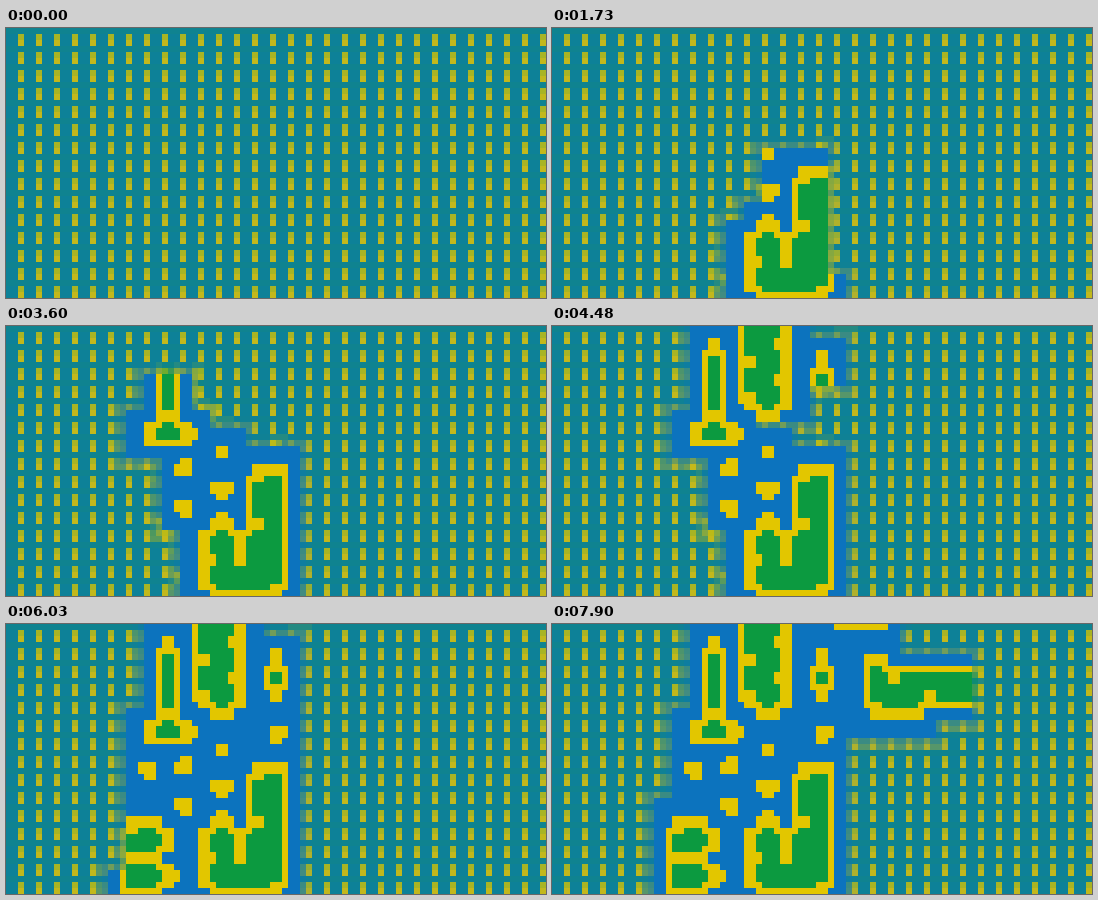
Animation, 540 px wide and 270 px high, one loop 8 s. Source, as an HTML page with a canvas:

```html
<!DOCTYPE html>
<html lang="en">
<head>
<meta charset="utf-8">
<title>Islands</title>
<style>
html, body { margin: 0; width: 100%; height: 100%; overflow: hidden; background: #0b8294; }
canvas { display: block; }
</style>
</head>
<body>
<canvas id="stage" width="540" height="270"></canvas>
<script>
const LOOP = 8000, PX = 6, COLS = 30, ROWS = 15;
const SEA = [12, 115, 190], SAND = [226, 198, 0], GRASS = [12, 154, 64];
const TEAL = [13, 129, 152], TEAL_TOP = [15, 131, 144];
const DASH = [[168, 180, 36], [194, 184, 28]];

const mix = (a, b, k) => a.map((v, i) => v + (b[i] - v) * k);

// --- Terrain: grass blocks, a beach around all grass, and bare sand spits ---
const grass = new Set(), spits = new Set();
const key = (x, y) => x + ',' + y;
const bite = (x, y) => grass.delete(key(x, y));

function block(x, y, w, h, cutCorners = '') {
  for (let j = 0; j < h; j++)
    for (let i = 0; i < w; i++) grass.add(key(x + i, y + j));
  for (const corner of cutCorners.split(' ').filter(Boolean))
    bite(corner[1] === 'w' ? x : x + w - 1, corner[0] === 'n' ? y : y + h - 1);
}

function spit(x, y, arms = '') {
  spits.add(key(x, y));
  const step = { N: [0, -1], S: [0, 1], W: [-1, 0], E: [1, 0] };
  for (const arm of arms) spits.add(key(x + step[arm][0], y + step[arm][1]));
}

// West
block(18, 4, 1, 6);
block(18, 11, 1, 1);
block(17, 12, 3, 1);
spit(18, 3, 'N');
spit(20, 12, 'E');
// North
block(22, 0, 4, 9, 'sw');
block(24, 9, 1, 1);
bite(22, 4);
bite(25, 2);
bite(25, 6);
block(33, -1, 4, 1);
// Islets
block(30, 6, 1, 1);
spit(30, 4, 'NS');
spit(30, 7, 'S');
spit(30, 12, 'ES');
spit(24, 14);
spit(20, 16, 'WN');
spit(16, 16, 'WS');
spit(24, 18, 'WES');
spit(20, 20, 'WS');
// South-west
block(14, 23, 4, 3, 'nw ne se');
block(14, 27, 4, 3, 'ne se');
spit(18, 28, 'E');
// South
block(28, 17, 3, 13, 'nw se');
bite(28, 22);
block(23, 23, 3, 4, 'nw ne sw');
block(23, 27, 5, 3, 'sw');
block(27, 24, 1, 3);
spit(24, 22, 'N');
// East
block(36, 6, 12, 3);
block(36, 5, 1, 1);
block(37, 9, 4, 1);
bite(38, 6);
bite(42, 8);

function terrain(x, y) {
  if (grass.has(key(x, y))) return GRASS;
  if (spits.has(key(x, y))) return SAND;
  for (let j = -1; j <= 1; j++)
    for (let i = -1; i <= 1; i++) if (grass.has(key(x + i, y + j))) return SAND;
  return SEA;
}

// Neighbouring cells share their border, so border points are two pixels wide.
const point = p => Math.floor((2 * p + 2) / 3);
const map = Array.from({ length: ROWS * 3 }, (_, y) =>
  Array.from({ length: COLS * 3 }, (_, x) => terrain(point(x), point(y))));

// --- Growth: every stage fills its areas (col, row, width, height) outwards from the last cell ---
const STAGE_MS = 850, FIRST_MS = 30, FILL_MS = 740, CELL_MS = 36;
const stages = [
  [[10, 11, 2, 4], [11, 10, 2, 2]],
  [[12, 7, 3, 8]],
  [[11, 7, 5, 8], [11, 6, 2, 1]],
  [[9, 7, 2, 4], [7, 5, 4, 2]],
  [[8, 3, 2, 2], [8, 0, 6, 5]],
  [[11, 1, 5, 6]],
  [[7, 7, 2, 2], [7, 9, 3, 6]],
  [[6, 10, 1, 5], [14, 0, 5, 1]],
  [[16, 1, 3, 1], [16, 2, 5, 4]],
  [[21, 2, 2, 3]]
];

const settleAt = new Map();
let head = [11, 14];
stages.forEach((areas, s) => {
  const queue = new Map();
  for (const [col, row, w, h] of areas) {
    const cells = Array.from({ length: w * h }, (_, i) => [col + i % w, row + Math.floor(i / w)])
      .filter(([c, r]) => !settleAt.has(key(c, r)) && !queue.has(key(c, r)));
    const [hc, hr] = head;
    cells.sort((a, b) => Math.hypot(a[0] - hc, a[1] - hr) - Math.hypot(b[0] - hc, b[1] - hr));
    for (const [c, r] of cells) queue.set(key(c, r), head = [c, r]);
  }
  const n = queue.size, span = Math.min(FILL_MS, CELL_MS * n);
  [...queue.keys()].forEach((id, k) =>
    settleAt.set(id, FIRST_MS + s * STAGE_MS + span * Math.pow(k / (n - 1), 1 / 1.5)));
});

// --- Drawing ---
const ctx = document.getElementById('stage').getContext('2d');

function undecided(px, py) {
  if (py === 0) return TEAL_TOP;
  return px === 2 ? DASH[py - 1] : TEAL;
}

const reach = (dir, p) => dir < 0 ? p + 1 : dir > 0 ? 3 - p : 0;

function settledNear(c, r, t) {
  const near = [];
  for (let dy = -1; dy <= 1; dy++)
    for (let dx = -1; dx <= 1; dx++)
      if (settleAt.get(key(c + dx, r + dy)) <= t) near.push([dx, dy]);
  return near;
}

// Pixels close to a settled cell already lean towards their final colour.
function colourAt(x, y, px, py, near) {
  const base = undecided(px, py);
  if (!near.length) return base;
  const d = Math.min(...near.map(([dx, dy]) => Math.max(reach(dx, px), reach(dy, py))));
  if (d <= 1) return map[y][x];
  const hazy = py ? mix(base, DASH[py - 1], 0.45) : base;
  return mix(hazy, map[y][x], d === 2 ? 0.35 : 0.1);
}

function draw(t) {
  for (let r = 0; r < ROWS; r++)
    for (let c = 0; c < COLS; c++) {
      const near = settledNear(c, r, t);
      for (let i = 0; i < 9; i++) {
        const px = i % 3, py = (i - px) / 3, x = c * 3 + px, y = r * 3 + py;
        ctx.fillStyle = `rgb(${colourAt(x, y, px, py, near).map(Math.round)})`;
        ctx.fillRect(x * PX, y * PX, PX, PX);
      }
    }
}

const times = [...settleAt.values()];
const start = performance.now();
let shown = -1;
function tick() {
  const t = (performance.now() - start) % LOOP;
  const count = times.filter(at => at <= t).length;
  if (count !== shown) {
    draw(t);
    shown = count;
  }
  requestAnimationFrame(tick);
}
tick();
</script>
</body>
</html>
```
